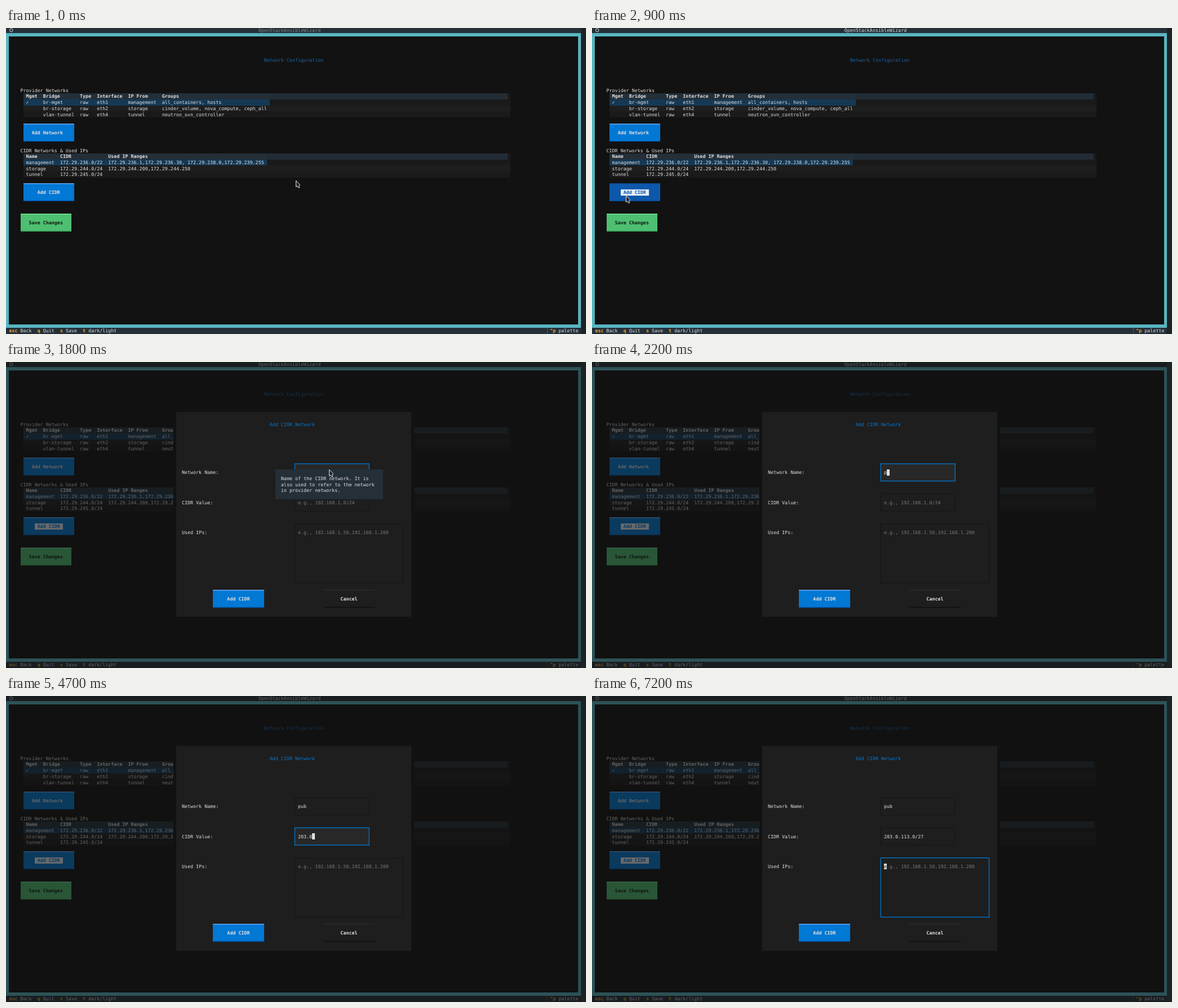
These frames come from a looping animation (1029 px wide and 544 px high, 8 s). An HTML page with a canvas:

```html
<!DOCTYPE html>
<html lang="en">
<head>
<meta charset="utf-8">
<title>Network configuration</title>
<style>
html, body { margin: 0; width: 1029px; height: 544px; overflow: hidden; background: #1c2327; }
canvas { display: block; }
</style>
</head>
<body>
<canvas id="stage" width="1029" height="544"></canvas>
<script>
const ctx = document.getElementById('stage').getContext('2d');
const LOOP = 8000;
const BG = '#121212', SURFACE = '#1e1e1e', PANEL = '#242f38', TEXT = '#e0e0e0';
const BLUE = '#0178d4', ACCENT = '#ffa62b', MUTED = '#797979';

// Terminal grid: column and row to pixels
const X = col => 0.4 + 5.025 * col;
const Y = row => -1.3 + 10.68 * row;

function rect(x0, y0, x1, y1, color) {
  ctx.fillStyle = color;
  ctx.fillRect(x0, y0, x1 - x0, y1 - y0);
}

function cells(c0, r0, c1, r1, color) {
  rect(Math.round(X(c0)), Math.round(Y(r0)), Math.round(X(c1)), Math.round(Y(r1)), color);
}

function text(str, col, row, color = TEXT, bold = false) {
  ctx.font = `${bold ? 'bold ' : ''}8.347px "DejaVu Sans Mono", monospace`;
  ctx.fillStyle = color;
  [...str].forEach((ch, i) => ctx.fillText(ch, X(col + i), Y(row) + 8.3));
}

function button(label, col, row, labelCol, { bg = BLUE, top = '#6db2ff', bottom = '#004f9c', color = TEXT, focus } = {}) {
  const x0 = Math.round(X(col)), x1 = Math.round(X(col + 18));
  const y0 = Math.round(Y(row)), y1 = Math.round(Y(row + 3));
  rect(x0, y0, x1, y1, bg);
  rect(x0, y0, x1, y0 + 1.3, top);
  rect(x0, y1 - 1.3, x1, y1, bottom);
  if (focus) cells(labelCol - 1, row + 1, labelCol + label.length + 1, row + 2, '#e6eef6');
  text(label, labelCol, row + 1, focus ? bg : color, true);
}

function table(top, endCol, columns, header, rows) {
  cells(6, top, 178, top + 4, '#1a1a1a');
  cells(6, top, 177, top + 1, '#222c35');
  cells(6, top, endCol, top + 1, PANEL);
  cells(6, top + 1, endCol, top + 2, '#153955');
  cells(6, top + 2, 178, top + 3, SURFACE);
  header.forEach((s, i) => text(s, columns[i], top, TEXT, true));
  rows.forEach((row, r) => row.forEach((s, i) => text(s, columns[i], top + 1 + r)));
}

function drawMain(t) {
  cells(0, -1, 203, 52, BG);
  cells(0, 0, 203, 1, PANEL);
  ctx.strokeStyle = TEXT;
  ctx.lineWidth = 1;
  ctx.beginPath();
  ctx.arc(9.3, 4, 2.8, 0, 7);
  ctx.stroke();
  text('OpenStackAnsibleWizard', 89, 0, t < 900 ? '#82888c' : TEXT);

  const teal = '#58b5c0';
  cells(0, 1, 203, 1.5, teal);
  cells(0, 49.5, 203, 50, teal);
  cells(0, 1, 1, 50, teal);
  cells(202, 1, 203, 50, teal);

  text('Network Configuration', 91, 5, '#1a65a8');
  text('Provider Networks', 5, 10);
  table(11, 93, [7, 13, 26, 32, 43, 55],
    ['Mgmt', 'Bridge', 'Type', 'Interface', 'IP From', 'Groups'], [
    ['✓', 'br-mgmt', 'raw', 'eth1', 'management', 'all_containers, hosts'],
    ['', 'br-storage', 'raw', 'eth2', 'storage', 'cinder_volume, nova_compute, ceph_all'],
    ['', 'vlan-tunnel', 'raw', 'eth4', 'tunnel', 'neutron_ovn_controller']]);
  button('Add Network', 6, 16, 9);

  text('CIDR Networks & Used IPs', 5, 20);
  table(21, 92, [7, 19, 36], ['Name', 'CIDR', 'Used IP Ranges'], [
    ['management', '172.29.236.0/22', '172.29.236.1,172.29.236.30, 172.29.238.0,172.29.239.255'],
    ['storage', '172.29.244.0/24', '172.29.244.200,172.29.244.250'],
    ['tunnel', '172.29.245.0/24']]);
  const hover = t >= 600 && t < 1100, pressed = hover && t >= 900;
  button('Add CIDR', 6, 26, 11, {
    ...(hover && { bg: '#0d58ab' }),
    ...(pressed && { top: '#0a4a92', bottom: '#0a4a92' }),
    focus: t >= 900
  });
  button('Save Changes', 5, 31, 8, { bg: '#4ebf71', top: '#7ce99b', bottom: '#2b8a4a', color: '#0b1a10' });

  cells(0, 50, 203, 52, PANEL);
  [['esc', 'Back', 1], ['q', 'Quit', 11], ['s', 'Save', 19], ['t', 'dark/light', 27], ['^p', 'palette', 192]]
    .forEach(([key, name, col]) => {
      text(key, col, 50, ACCENT, true);
      text(name, col + key.length + 1, 50);
    });
  rect(X(191), Y(50), X(191) + 0.8, 544, '#566068');
}

function field(row, rows, endCol, { value, hint, focus, tint }) {
  const x0 = X(101) + 3.77, x1 = X(endCol) + 1.26, y0 = Y(row), y1 = Y(row + rows);
  rect(x0, y0, x1, y1, focus ? BLUE : '#181818');
  rect(x0 + 1.26, y0 + 1.33, x1 - 1.26, y1 - 1.33, focus && tint ? '#282828' : SURFACE);
  text(value || hint, 103, row + 1, value ? TEXT : MUTED);
  if (!focus) return;
  const col = 103 + value.length;
  cells(col, row + 1, col + 1, row + 2, TEXT);
  if (!value) text(hint[0], col, row + 1, '#282828');
}

// Characters whose key time has passed
const typed = (str, times, t) => str.slice(0, times.filter(k => k <= t).length);
const nameKeys = [2200, 2400, 2600];
const cidrKeys = [3800, 3900, 4000, 4200, 4700, 4800, 5000, 5200, 5700, 5900, 6200, 6400, 6600, 7000];

function drawDialog(t) {
  cells(59, 8, 144, 43, BG);
  cells(60, 8.5, 143, 42.5, SURFACE);
  text('Add CIDR Network', 93, 10, BLUE);
  text('Network Name:', 62, 18);
  text('CIDR Value:', 62, 23);
  text('Used IPs:', 62, 28);
  field(17, 3, 128, { value: typed('pub', nameKeys, t), hint: 'management', focus: t < 2900, tint: true });
  field(22, 3, 128, {
    value: typed('203.0.113.0/27', cidrKeys, t), hint: 'e.g., 192.168.1.0/24',
    focus: t >= 2900 && t < 7200, tint: true
  });
  field(27, 10, 140, { value: '', hint: 'e.g., 192.168.1.50,192.168.1.200', focus: t >= 7200 });
  button('Add CIDR', 73, 38, 78);
  button('Cancel', 112, 38, 118, { bg: SURFACE, top: '#2d2d2d', bottom: '#0d0d0d' });

  if (t >= 1800 && t < 2100) {
    cells(95, 18, 133, 23, PANEL);
    ['Name of the CIDR network. It is', 'also used to refer to the network', 'in provider networks.']
      .forEach((line, i) => text(line, 97, 19 + i));
  }
}

// Pointer path: time, x, y
const path = [[100, 514, 271], [400, 290, 259], [600, 80, 290], [700, 60, 298],
  [900, 60, 298], [1000, 92, 292], [1300, 573, 191]];

function drawPointer(t) {
  if (t >= 2100) return;
  const i = path.findIndex(p => p[0] > t);
  const b = path[i < 0 ? path.length - 1 : i], a = i > 0 ? path[i - 1] : b;
  const f = a === b ? 0 : (t - a[0]) / (b[0] - a[0]);
  ctx.save();
  ctx.translate(a[1] + (b[1] - a[1]) * f + 0.5, a[2] + (b[2] - a[2]) * f + 0.3);
  const arrow = new Path2D('M0 0V11.3L2.4 9.6L4.4 13.2L6.4 12.2L5.2 8.8L7.2 7.4Z');
  ctx.fillStyle = '#262626';
  ctx.strokeStyle = '#e8e8e8';
  ctx.lineWidth = 1;
  ctx.lineJoin = 'round';
  ctx.fill(arrow);
  ctx.stroke(arrow);
  ctx.restore();
}

function render(now) {
  const t = Math.floor(now % LOOP / 100) * 100;
  ctx.textRendering = 'geometricPrecision';
  ctx.clearRect(0, 0, 1029, 544);
  drawMain(t);
  if (t >= 1000) {
    cells(0, -1, 203, 52, 'rgba(18,18,18,.6)');
    drawDialog(t);
  }
  drawPointer(t);
}

const start = performance.now();
function tick() {
  render(performance.now() - start);
  requestAnimationFrame(tick);
}
tick();
</script>
</body>
</html>
```
